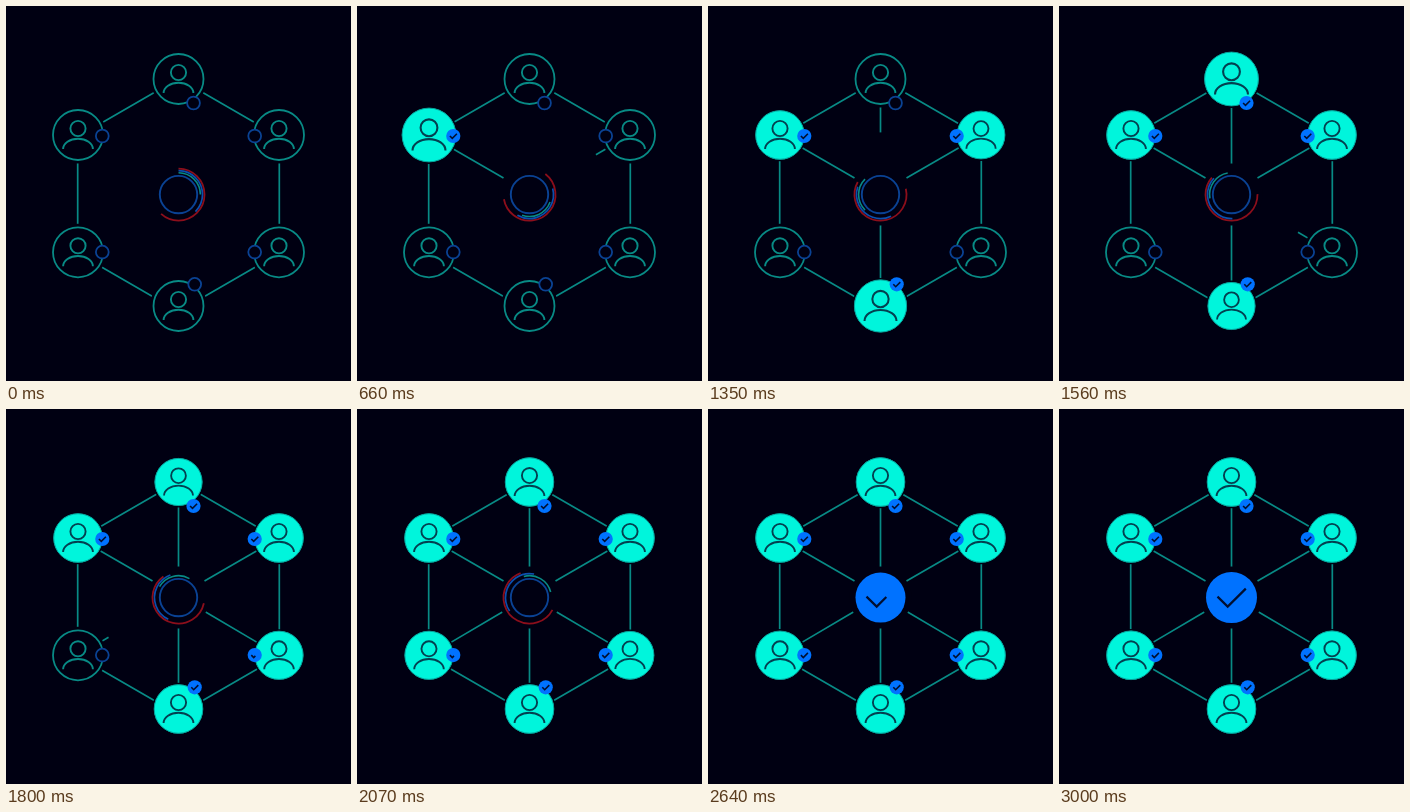
An HTML page with a canvas for the animation above (4 s loop, 345 px wide and 375 px high).

```html
<!DOCTYPE html>
<html lang="en">
<head>
<meta charset="utf-8">
<title>Consensus network</title>
<style>
  html, body { margin: 0; width: 100%; height: 100%; overflow: hidden; background: #000012; }
  canvas { display: block; width: 345px; height: 375px; }
</style>
</head>
<body>
<canvas id="stage"></canvas>
<script>
const LOOP = 4000, STEP = 30, END = 3000;
const BG = '#000012', TEAL = '#088a85', MINT = '#00f5dc', RIM = '#06a39b', INK = '#034050';
const BLUE = '#0072ff', DIM_BLUE = '#0a4294', CHECK_INK = '#000f30', RED = '#8c0e1b';
const HUB = { x: 172.5, y: 188.6, gap: 31 };
const HEXAGON = { x: 172.5, y: 189, r: 116.4 };
const FOCUS = { x: 172.5, y: 187 };

// Clockwise from the top; badge offsets are relative to the node, peak is the height of its pulse.
const nodes = [
  { x: 172.5, y: 73, bx: 15, by: 24, peak: 1590 },
  { x: 273, y: 129, bx: -24.3, by: 1, peak: 990 },
  { x: 273, y: 246.3, bx: -24.3, by: -0.2, peak: 1890 },
  { x: 172.5, y: 300, bx: 16.2, by: -21.7, peak: 1290 },
  { x: 72, y: 246.3, bx: 24.3, by: -0.2, peak: 2160 },
  { x: 72, y: 129, bx: 24.3, by: 1, peak: 690 }
];

const pulse = [[-150, 23], [-90, 24.3], [-30, 27.1], [0, 28.5], [60, 26.3],
  [150, 24.4], [230, 23.6], [390, 24.2], [510, 24.5]];
const hubGrowth = [[2280, 18.8], [2340, 19.6], [2400, 23], [2460, 27], [2490, 27.8],
  [2550, 26.4], [2640, 25], [2730, 25.2], [2850, 25.5]];

const canvas = document.getElementById('stage');
const ctx = canvas.getContext('2d');
const ratio = window.devicePixelRatio || 1;
canvas.width = 345 * ratio;
canvas.height = 375 * ratio;

const progress = (t, from, to) => Math.min(1, Math.max(0, (t - from) / (to - from)));

function sample(table, t) {
  if (t <= table[0][0]) return table[0][1];
  for (let i = 1; i < table.length; i++) {
    const [t0, v0] = table[i - 1], [t1, v1] = table[i];
    if (t <= t1) return v0 + (v1 - v0) * (t - t0) / (t1 - t0);
  }
  return table[table.length - 1][1];
}

function stroke(color, width) {
  ctx.strokeStyle = color;
  ctx.lineWidth = width;
  ctx.stroke();
}

function disc(x, y, r, color) {
  ctx.beginPath();
  ctx.arc(x, y, r, 0, Math.PI * 2);
  ctx.fillStyle = color;
  ctx.fill();
}

function ring(x, y, r, color, width, from = 0, sweep = 360) {
  const start = (from - 90) * Math.PI / 180;
  ctx.beginPath();
  ctx.arc(x, y, r, start, start + sweep * Math.PI / 180);
  stroke(color, width);
}

function line(x0, y0, x1, y1) {
  ctx.beginPath();
  ctx.moveTo(x0, y0);
  ctx.lineTo(x1, y1);
  stroke(TEAL, 1.7);
}

function withAlpha(alpha, draw) {
  if (alpha <= 0) return;
  ctx.save();
  ctx.globalAlpha = alpha;
  draw();
  ctx.restore();
}

// Draws the first part p of a tick through three points.
function tick(x, y, [a, b, c], p, width) {
  if (p <= 0) return;
  const l1 = Math.hypot(b[0] - a[0], b[1] - a[1]);
  const l2 = Math.hypot(c[0] - b[0], c[1] - b[1]);
  const length = p * (l1 + l2);
  const u = Math.min(1, length / l1), v = Math.max(0, (length - l1) / l2);
  ctx.beginPath();
  ctx.moveTo(x + a[0], y + a[1]);
  ctx.lineTo(x + a[0] + (b[0] - a[0]) * u, y + a[1] + (b[1] - a[1]) * u);
  if (v > 0) ctx.lineTo(x + b[0] + (c[0] - b[0]) * v, y + b[1] + (c[1] - b[1]) * v);
  stroke(CHECK_INK, width);
}

function person(x, y, scale, color) {
  ctx.save();
  ctx.translate(x, y);
  ctx.scale(scale, scale);
  ring(0, -6.5, 7.6, color, 1.9);
  ctx.beginPath();
  ctx.ellipse(0, 14, 14.9, 10.3, 0, Math.PI, Math.PI * 2);
  stroke(color, 1.9);
  ctx.restore();
}

function hexagon() {
  ctx.beginPath();
  for (let i = 0; i < 6; i++) {
    const angle = i * Math.PI / 3;
    ctx.lineTo(HEXAGON.x + HEXAGON.r * Math.sin(angle), HEXAGON.y - HEXAGON.r * Math.cos(angle));
  }
  ctx.closePath();
  stroke(TEAL, 1.7);
}

function spoke(n, t) {
  const p = progress(t, n.peak - 450, n.peak - 90);
  if (p <= 0) return;
  const dx = FOCUS.x - n.x, dy = FOCUS.y - n.y, d = Math.hypot(dx, dy);
  const tip = 28 + (d - 57) * Math.pow(p, 1.5);
  line(n.x + dx * 20 / d, n.y + dy * 20 / d, n.x + dx * tip / d, n.y + dy * tip / d);
}

function drawNode(n, t) {
  const local = t - n.peak;
  const fill = progress(local, -165, -95);
  const r = sample(pulse, local);
  const bx = n.x + n.bx, by = n.y + n.by;

  disc(n.x, n.y, fill > 0 ? r + 1.8 : 28.5, BG);
  withAlpha(1 - fill, () => {
    ring(n.x, n.y, 25, TEAL, 1.8);
    person(n.x, n.y, 1, TEAL);
  });
  withAlpha(fill, () => {
    disc(n.x, n.y, r, MINT);
    ring(n.x, n.y, r - 0.2, RIM, 1);
    person(n.x, n.y, r / 24.5, INK);
  });

  withAlpha(1 - fill, () => {
    disc(bx, by, 6.5, BG);
    ring(bx, by, 6.4, DIM_BLUE, 1.8);
  });
  withAlpha(fill, () => disc(bx, by, 7.1, BLUE));
  tick(bx, by, [[-3.4, 0], [-1, 2.4], [3.6, -2.2]], progress(local, -160, -40), 1.6);
}

function drawHub(t) {
  const { x, y } = HUB;
  const fill = progress(t, 2190, 2280);
  withAlpha(1 - fill, () => {
    ring(x, y, 18.7, DIM_BLUE, 1.9);
    ring(x, y, 26, RED, 1.8, t * 0.057, 222);
    ring(x, y, 24, '#0c4fae', 1.7, t * 0.114, 135);
    ring(x, y, 21.9, TEAL, 1.6, t / 6, 90);
  });
  withAlpha(fill, () => disc(x, y, sample(hubGrowth, t), BLUE));
  tick(x, y, [[-14, -1], [-3.8, 9], [14.3, -9]], progress(t, 2430, 2730), 2.2);
}

function draw(t) {
  ctx.setTransform(ratio, 0, 0, ratio, 0, 0);
  ctx.fillStyle = BG;
  ctx.fillRect(0, 0, 345, 375);
  hexagon();
  nodes.forEach(n => spoke(n, t));
  disc(HUB.x, HUB.y, HUB.gap, BG);
  nodes.forEach(n => drawNode(n, t));
  drawHub(t);
}

const began = performance.now();
function play() {
  const t = (performance.now() - began) % LOOP;
  draw(Math.min(END, Math.floor(t / STEP) * STEP));
  requestAnimationFrame(play);
}
play();
</script>
</body>
</html>
```
